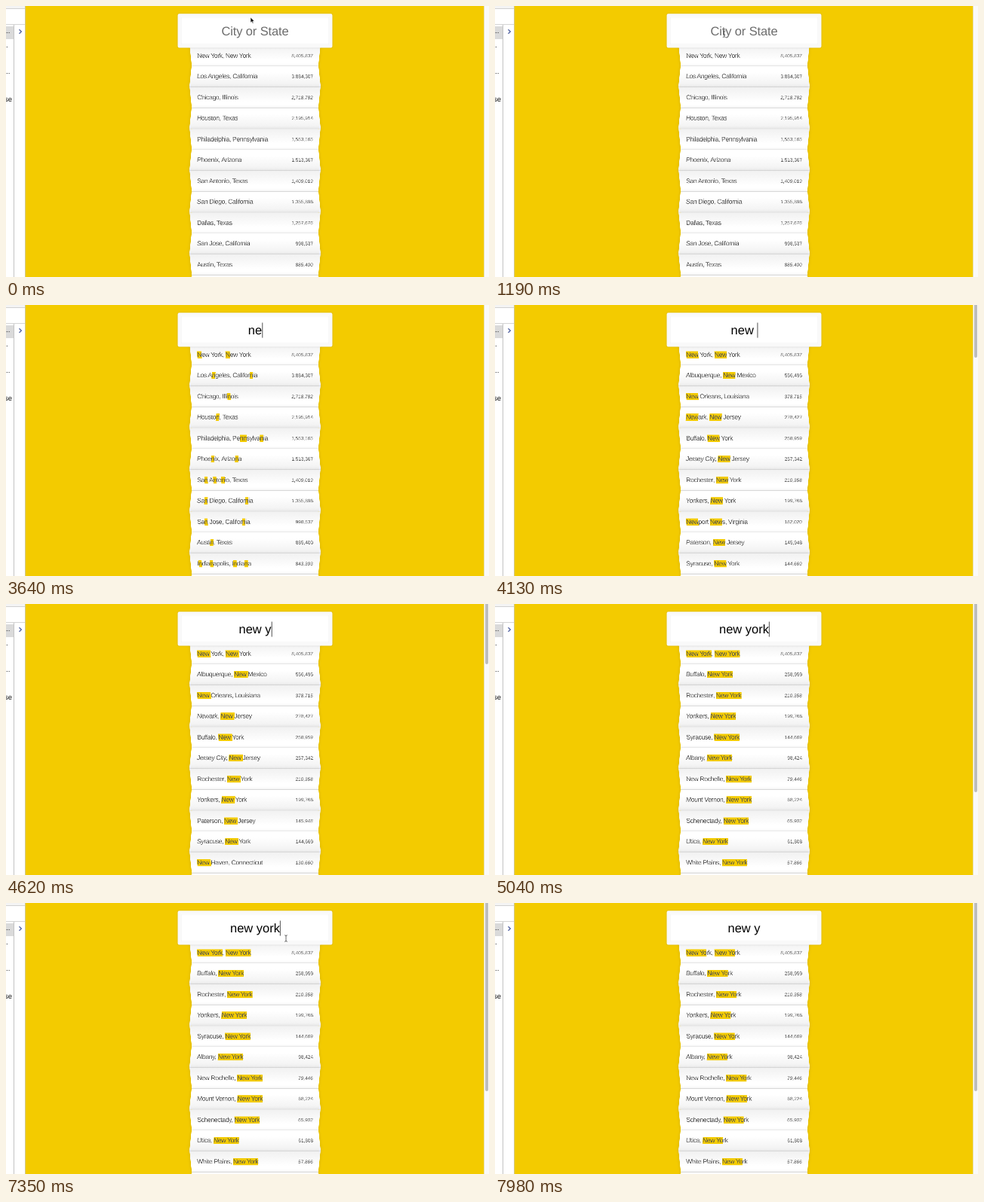
An HTML page that plays this animation: 640 px wide and 360 px high, repeating every 8 s.

```html
<!DOCTYPE html>
<html lang="en">
<head>
<meta charset="utf-8">
<title>City search</title>
<style>
  html, body { margin: 0; width: 100%; height: 100%; overflow: hidden; }
  body { font-family: "Liberation Sans", Arial, sans-serif; text-rendering: geometricPrecision; }
  #stage { position: absolute; left: 0; top: 0; width: 640px; height: 360px; overflow: hidden; background: #f3cb00; }

  #panel { position: absolute; left: 0; top: 0; width: 25px; height: 360px; background: #fff; border-right: 1px solid #d2c98f; font-size: 9.5px; color: #111; }
  #panel i { position: absolute; display: block; }
  #panel b { position: absolute; left: 0; font-weight: normal; line-height: 12px; }

  #track { position: absolute; left: 633px; top: 0; width: 7px; height: 360px; background: #fafafa; border-left: 1px solid #e9dfa8; box-sizing: border-box; }
  #thumb { position: absolute; left: 1px; top: -4px; width: 4px; background: #bdbdbd; border-radius: 2px; }

  /* The page is laid out at full size and shown scaled down. */
  #page { position: absolute; left: 330px; top: 0; transform: scale(.427); transform-origin: 0 0; }
  #list { position: absolute; left: -200px; top: 119.7px; width: 400px; margin: 0; padding: 0; list-style: none; background: linear-gradient(#dedede, #dedede) center / 390px no-repeat; }
  #list li { display: flex; justify-content: space-between; align-items: center; box-sizing: border-box; height: 65px; padding: 0 20px; font-size: 20px; letter-spacing: -.74px; color: #505050; white-space: pre; border-bottom: 1px solid #d8d8d8; box-shadow: 0 0 10px rgba(0, 0, 0, .12); }
  #list li:nth-child(even) { transform: perspective(100px) rotateX(3deg) translateY(2px) scale(1.001); background: linear-gradient(to bottom, #fff 30%, #f1f1f1); }
  #list li:nth-child(odd) { transform: perspective(100px) rotateX(-3deg) translateY(3px); background: linear-gradient(to top, #fff 30%, #f1f1f1); }
  #list .pop { font-size: 15px; letter-spacing: 0; color: #505050; }
  #list mark { background: #f3cb00; color: inherit; }

  #search { position: absolute; left: -240px; top: 24px; width: 480px; height: 106px; box-sizing: border-box; border: 10px solid #f9f9f9; border-radius: 5px; background: #fff; box-shadow: 0 0 5px rgba(0, 0, 0, .16), inset 0 0 3px rgba(0, 0, 0, .24); display: flex; align-items: center; justify-content: center; font-size: 38.6px; white-space: pre; }
  #field { position: relative; top: 3px; }
  #field.empty { color: #6c6c6c; letter-spacing: -.3px; }
  #caret { position: absolute; top: 53px; margin-top: -32px; width: 2.4px; height: 47px; background: #333; }

  #mouse { position: absolute; left: 0; top: 0; width: 640px; height: 360px; }
</style>
</head>
<body>
<div id="stage">
  <div id="panel">
    <i style="left:0;top:0;width:25px;height:3px;background:#f4f4f4;border-bottom:1px solid #d0d0d0"></i>
    <i style="left:0;top:24px;width:25px;height:1px;background:#d4d4d4"></i>
    <i style="left:0;top:27px;width:10px;height:17px;background:#dadada"></i>
    <i style="left:10px;top:25px;width:1px;height:335px;background:#c4c4c4"></i>
    <b style="top:28px">..</b>
    <b style="top:47px">.</b>
    <b style="top:82px">..</b>
    <b style="top:119px;left:-2px">se</b>
    <svg style="position:absolute;left:16px;top:30px" width="7" height="9"><path d="M1.5 1.2 4.4 4 1.5 6.8" fill="none" stroke="#4a5a9c" stroke-width="1.2"/></svg>
  </div>
  <div id="track"><div id="thumb"></div></div>
  <div id="page">
    <ul id="list"></ul>
    <div id="search"><span id="field"></span><div id="caret"></div></div>
  </div>
  <svg id="mouse">
    <path id="arrow" d="M0 0V7.2L1.7 5.7 2.8 8.2 4 7.7 2.9 5.3H5.2Z" fill="#111" stroke="#fff" stroke-width=".6"/>
    <path id="beam" d="M-1.8-4.3Q0-4.3 0-3V3Q0 4.3-1.8 4.3M1.8-4.3Q0-4.3 0-3M0 3Q0 4.3 1.8 4.3" fill="none" stroke="#444" stroke-width=".8"/>
  </svg>
</div>
<script>
const LOOP = 8000, ROWS = 11;

const cities = `New York, New York|8,405,837
Los Angeles, California|3,884,307
Chicago, Illinois|2,718,782
Houston, Texas|2,195,914
Philadelphia, Pennsylvania|1,553,165
Phoenix, Arizona|1,513,367
San Antonio, Texas|1,409,019
San Diego, California|1,355,896
Dallas, Texas|1,257,676
San Jose, California|998,537
Austin, Texas|885,400
Indianapolis, Indiana|843,393
Memphis, Tennessee|653,450
Nashville-Davidson, Tennessee|634,464
Las Vegas, Nevada|603,488
Albuquerque, New Mexico|556,495
Omaha, Nebraska|434,353
Minneapolis, Minnesota|400,070
New Orleans, Louisiana|378,715
St. Paul, Minnesota|294,873
Newark, New Jersey|278,427
Henderson, Nevada|270,811
Buffalo, New York|258,959
Jersey City, New Jersey|257,342
Rochester, New York|210,358
Yonkers, New York|199,766
Newport News, Virginia|182,020
Paterson, New Jersey|145,948
Syracuse, New York|144,669
New Haven, Connecticut|130,660
Albany, New York|98,424
New Rochelle, New York|79,446
Mount Vernon, New York|68,224
Schenectady, New York|65,902
Utica, New York|61,808
White Plains, New York|57,866`.split('\n').map(line => line.split('|'));

// The list follows the typed text with a short delay.
const typed = [[0, ''], [3290, 'n'], [3640, 'ne'], [3850, 'new'], [4130, 'new '], [4480, 'new y'],
  [4690, 'new yo'], [4830, 'new yor'], [4900, 'new york'],
  [7700, 'new yor'], [7840, 'new yo'], [7980, 'new y']];
const filters = [[0, ''], [3640, 'n'], [3780, 'ne'], [3920, 'new'], [4270, 'new '], [4690, 'new y'],
  [4760, 'new yo'], [4900, 'new yor'], [4970, 'new york'],
  [7770, 'new yor'], [7910, 'new yo']];
const carets = [[0, 0], [2100, 1], [2660, 0], [3150, 1], [5430, 0], [5970, 1], [6500, 0], [7030, 1], [7560, 0]];
const thumbs = [[0, 0], [3780, 34], [3920, 74], [4270, 84], [4690, 254]];
const pointer = [[0, 1], [3290, 0], [5740, 1], [7700, 0]];
const path = [[0, 324, 15], [300, 324, 15], [1300, 303, 38], [1750, 303, 38], [1820, 308, 37],
  [5740, 308, 37], [6440, 327, 188], [6580, 327, 188], [7070, 346, 60], [7210, 346, 60], [7350, 371, 47]];

const $ = id => document.getElementById(id);
const show = (el, on) => { el.style.visibility = on ? 'visible' : 'hidden'; };
const at = (steps, t) => steps.findLast(s => s[0] <= t)[1];

function pointAt(t) {
  const i = path.findLastIndex(p => p[0] <= t);
  const [t0, x0, y0] = path[i], [t1, x1, y1] = path[i + 1] || path[i];
  const u = t1 > t0 ? (t - t0) / (t1 - t0) : 0;
  const k = u * u * (3 - 2 * u);
  return [x0 + (x1 - x0) * k, y0 + (y1 - y0) * k];
}

function renderList(word) {
  const match = new RegExp(word, 'gi');
  const mark = name => word ? name.replace(match, '<mark>$&</mark>') : name;
  $('list').innerHTML = cities
    .filter(([name]) => name.toLowerCase().includes(word))
    .slice(0, ROWS)
    .map(([name, pop]) => `<li><span>${mark(name)}</span><span class="pop">${pop}</span></li>`)
    .join('') + '<li></li>';
}

function renderField(text) {
  const field = $('field');
  field.textContent = text || 'City or State';
  field.className = text ? '' : 'empty';
  const half = text ? field.offsetWidth / 2 : 0;
  $('caret').style.left = 230 + half + 'px';
}

let lastWord, lastText;
function draw(t) {
  const word = at(filters, t), text = at(typed, t);
  if (word !== lastWord) renderList(lastWord = word);
  if (text !== lastText) renderField(lastText = text);
  show($('caret'), at(carets, t));
  $('thumb').style.height = at(thumbs, t) + 'px';

  const [x, y] = pointAt(t), on = at(pointer, t), overText = y > 24 && y < 52;
  for (const [id, visible] of [['arrow', on && !overText], ['beam', on && overText]]) {
    $(id).setAttribute('transform', `translate(${x} ${y})`);
    show($(id), visible);
  }
}

const start = performance.now();
function tick() {
  draw((performance.now() - start) % LOOP);
  requestAnimationFrame(tick);
}
draw(0);
requestAnimationFrame(tick);
</script>
</body>
</html>
```
